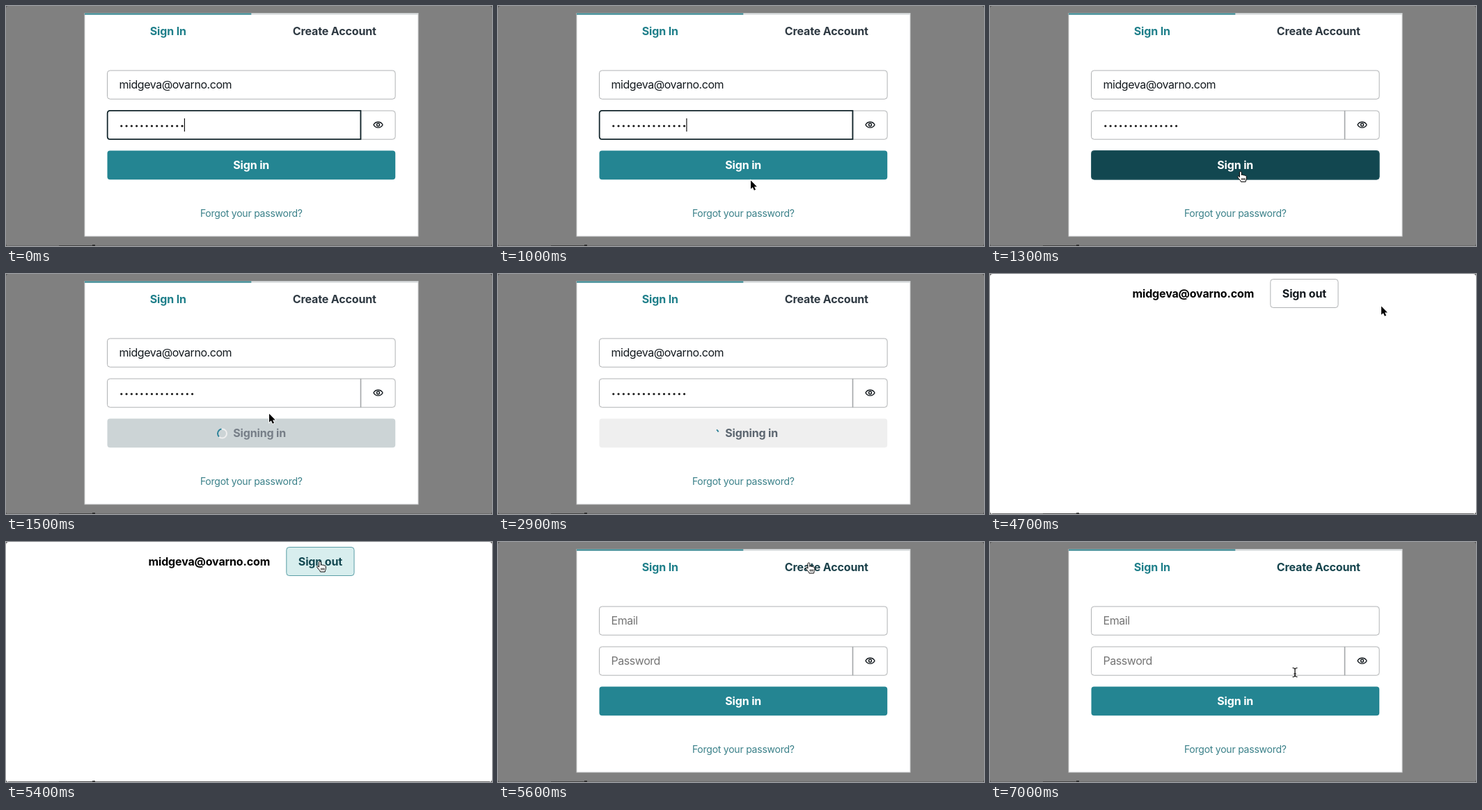
An HTML page for the animation above (7.1 s loop, 698 by 346 pixels).

```html
<!DOCTYPE html>
<html lang="en">
<head>
<meta charset="utf-8">
<title>Sign in and out</title>
<style>
  html, body { margin: 0; width: 100%; height: 100%; overflow: hidden; background: #555; }
  svg { display: block; width: 698px; height: 346px; }
  text { font: 16px Inter, "Open Sans", sans-serif; letter-spacing: -.028em; fill: #13191e; }
  .bold { font-weight: 700; letter-spacing: -.009em; }
  .mid { text-anchor: middle; }
  .box { fill: #fff; stroke: #b0b2b4; }
  .hint { fill: #757575; }
  #arrow { stroke: #fff; stroke-width: 1.6; paint-order: stroke; }
  #hand { fill: #fff; stroke: #000; }
  #beam { fill: none; stroke: #000; stroke-width: 1.2; }
</style>
</head>
<body>
<svg viewBox="0 0 698 346">
  <rect id="page" width="698" height="346" rx="4"/>

  <g id="dialog">
    <rect x="113" y="10.5" width="479" height="321.5" fill="#fff" stroke="#c9cbcc"/>
    <path d="M113 11.5H592" stroke="#d3d7d9" stroke-width="1.8"/>
    <path d="M113 11.5H352.3" stroke="#2a828d" stroke-width="1.8"/>
    <text class="bold mid" x="232.8" y="42.2" style="fill:#1f7f8a">Sign In</text>
    <text class="bold mid" id="create" x="471.8" y="42.2">Create Account</text>

    <rect class="box" x="145.5" y="93" width="413.6" height="41.2" rx="4"/>
    <text id="email" x="162.5" y="119.2">midgeva@ovarno.com</text>
    <text class="hint" id="emailHint" x="162.5" y="119.2">Email</text>

    <rect class="box" x="145.5" y="151" width="413.6" height="41.2" rx="4"/>
    <path d="M509.5 151V192.2" stroke="#a3a6a8" stroke-width="1.6"/>
    <path id="focus" d="M509.4 150.8V192.2H149.7Q145.7 192.2 145.7 188.2V154.8Q145.7 150.8 149.7 150.8Z" fill="none" stroke="#16292f" stroke-width="1.8"/>
    <path id="dots" fill="none" stroke="#111" stroke-width="3.2" stroke-linecap="round"/>
    <path id="caret" stroke="#000" stroke-width="1.1"/>
    <text class="hint" id="passHint" x="162.5" y="177.4">Password</text>
    <g fill="none" stroke="#13191e" stroke-width="1.4">
      <path d="M528 171.3c2.6-5.4 10.4-5.4 13 0c-2.6 5.4-10.4 5.4-13 0z"/>
      <circle cx="534.5" cy="171.3" r="2"/>
    </g>

    <rect id="button" x="145.5" y="208.5" width="413.7" height="41.7" rx="4"/>
    <text class="bold" id="label" x="326.2" y="235.2"></text>
    <g id="spinner" fill="none" stroke-width="2">
      <circle cx="310.5" cy="230" r="6.5" stroke="#efefef"/>
      <circle id="arc" cx="310.5" cy="230" r="6.5" stroke="#2b8198" pathLength="1"/>
    </g>
    <text class="mid" x="352.3" y="304.2" style="font-size:14px;letter-spacing:-.017em;fill:#3a8089">Forgot your password?</text>
  </g>

  <g id="home">
    <text class="bold" x="204.5" y="33.5" style="fill:#000">midgeva@ovarno.com</text>
    <rect id="outBox" x="402.8" y="7.5" width="97.2" height="41" rx="4"/>
    <text class="bold mid" id="outLabel" x="451.4" y="34">Sign out</text>
  </g>

  <path d="M3 345.5H695" stroke="#6b6b6b"/>
  <path d="M76 345.5H128" stroke="#444"/>
  <path d="M124 345H128" stroke="#222" stroke-width="1.5"/>

  <g id="cursor">
    <path id="arrow" d="M0-.6V11.8L2.8 9.2L4.9 13.8L7 12.8L5 8.4H8.8Z"/>
    <path id="hand" d="M-1.6 1.4c0-1.9 2.9-1.9 2.9 0v4c.2-1 2.4-1 2.6.3c.5-.8 2.3-.6 2.4.6c.5-.6 2-.4 2 1v3.2c0 1.6-1 2.2-1.2 4.5h-6.6c-.4-2.2-3.6-4.4-4.8-6.8c-.5-1.2 1-2 2-.9l.7.9zM1.8 9.5v3M3.8 9.5v3M5.8 9.5v3"/>
    <path id="beam" d="M-3.5-6.5Q0-6.5 0-4Q0-6.5 3.5-6.5M0-4V4M-3.5 6.5Q0 6.5 0 4Q0 6.5 3.5 6.5M-1.8 2H1.8"/>
  </g>
</svg>

<script>
const LOOP = 7100, STEP = 100;
const $ = id => document.getElementById(id);
const show = (id, on) => $(id).style.display = on ? '' : 'none';
const set = (id, attrs) => { for (const k in attrs) $(id).setAttribute(k, attrs[k]); };
const fill = (id, color) => $(id).style.fill = color;

const INK = [46, 57, 66], TEAL = [36, 133, 146], DEEP = [18, 71, 80];
const IDLE = [239, 239, 239], MUTED = [92, 102, 112], WHITE = [255, 255, 255];

// Colour transition from a to b beginning at start
function blend(a, b, t, start, length = 250) {
  const u = Math.min(1, Math.max(0, (t - start) / length));
  const k = 1 - (1 - u) ** 2;
  return `rgb(${a.map((v, i) => Math.round(v + (b[i] - v) * k))})`;
}

// time, shape, x, y; each place holds until the next
const path = [
  [0, ''], [800, 'arrow', 365, 201], [1000, 'arrow', 363, 252],
  [1100, 'hand', 362, 244], [1200, 'hand', 361, 240], [1300, 'hand', 360, 238.5],
  [1400, 'hand', 362, 236], [1500, 'arrow', 378, 202], [1600, 'arrow', 448, 34],
  [1700, 'arrow', 469, 43], [1800, ''],
  [4700, 'arrow', 562, 47], [4800, 'arrow', 548, 66], [4900, 'arrow', 508, 52],
  [5000, 'hand', 478, 36], [5100, 'hand', 465, 30], [5200, 'hand', 457, 28],
  [5400, 'hand', 451, 28], [5500, 'hand', 448, 29], [5600, 'hand', 446.5, 30],
  [5700, 'hand', 446, 31], [5800, 'hand', 445, 32], [5900, 'hand', 445, 33],
  [6000, 'hand', 444, 34], [6100, 'hand', 443.5, 35], [6400, 'hand', 441, 38],
  [6500, 'hand', 437, 42], [6600, 'hand', 434.5, 44], [7000, 'beam', 438, 188],
];

function drawCursor(t) {
  const [, shape, x = 0, y = 0] = path.findLast(p => p[0] <= t);
  for (const id of ['arrow', 'hand', 'beam']) show(id, id === shape);
  set('cursor', { transform: `translate(${x} ${y})` });
}

function drawPassword(t) {
  const typing = t < 1200, filled = t < 5500;
  const count = t < 300 ? 13 : t < 700 ? 14 : 15, pitch = 7.27;
  let d = '';
  for (let i = 0; i < count; i++) d += `M${165.8 + i * pitch} 173h.01`;
  set('dots', { d });
  set('caret', { d: `M${256.4 + (count - 13) * pitch} 162V181` });
  show('focus', typing);
  show('caret', typing);
  show('dots', filled);
  show('email', filled);
  show('emailHint', !filled);
  show('passHint', !filled);
}

function drawButton(t) {
  const loading = t >= 1400 && t < 3000, pressed = t >= 1200 && t < 1400;
  $('label').textContent = loading ? 'Signing in' : 'Sign in';
  fill('label', loading ? blend(WHITE, MUTED, t, 1350) : '#fff');
  fill('button', loading ? blend(DEEP, IDLE, t, 1350)
    : t < 3000 ? blend(TEAL, DEEP, t, 1000) : `rgb(${TEAL})`);
  $('button').style.stroke = pressed ? '#2f5f68' : 'none';
  show('spinner', loading);

  const u = (t - 1400) / 1000 % 1;
  const length = .1 + .14 * (1 + Math.cos(2 * Math.PI * u));
  const angle = 96 + 360 * u + 26 * Math.sin(Math.PI * u) ** 2;
  set('arc', { 'stroke-dasharray': `${length} 1`, transform: `rotate(${angle} 310.5 230)` });
}

function drawHome(t) {
  const hover = t >= 5000;
  fill('outBox', t >= 5300 ? '#d8eeee' : hover ? '#eff8f8' : '#fff');
  $('outBox').style.stroke = hover ? '#5a9ea6' : '#b0b2b4';
  fill('outLabel', hover ? '#124750' : '#13191e');
}

function draw(t) {
  const home = t >= 3000 && t < 5500;
  fill('page', home ? '#fff' : '#808080');
  show('home', home);
  show('dialog', !home);
  fill('create', t >= 7000 ? blend(DEEP, INK, t, 6980) : blend(INK, DEEP, t, 5500));
  drawPassword(t);
  drawButton(t);
  drawHome(t);
  drawCursor(t);
}

const began = performance.now();
function tick() {
  const t = (performance.now() - began) % LOOP;
  draw(Math.floor(t / STEP) * STEP);
  requestAnimationFrame(tick);
}
tick();
</script>
</body>
</html>
```
